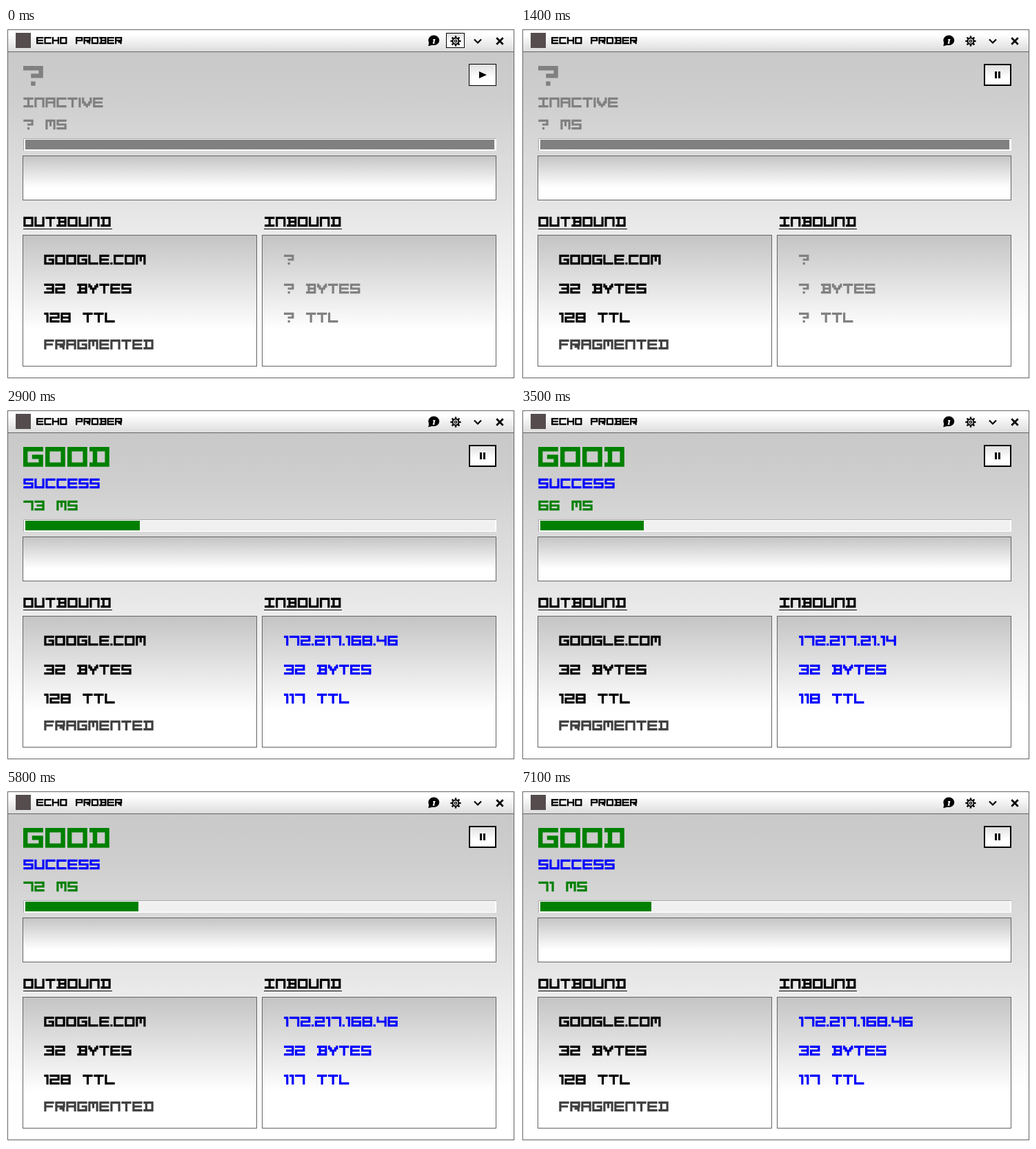
An HTML page for the animation above (7.2 s loop, 738 px wide and 512 px high).

```html
<!DOCTYPE html>
<html lang="en">
<head>
<meta charset="utf-8">
<title>Echo Prober</title>
<style>
  html, body { margin: 0; width: 100%; height: 100%; overflow: hidden; background: #fff; }
  svg { display: block; width: 738px; height: 512px; }
  .word path { fill: none; stroke-width: 2; stroke-linecap: square; stroke-linejoin: miter; }
  .word text { fill: none; font: 12px "DejaVu Sans Mono", monospace; }
</style>
</head>
<body>
<svg viewBox="0 0 738 512" xmlns="http://www.w3.org/2000/svg">
  <defs>
    <linearGradient id="bar" x2="0" y2="1">
      <stop offset=".2" stop-color="#fff"/><stop offset="1" stop-color="#dcdcdc"/>
    </linearGradient>
    <linearGradient id="page" x2="0" y2="1">
      <stop stop-color="#c6c6c6"/><stop offset=".2" stop-color="#cecece"/><stop offset=".85" stop-color="#fff"/>
    </linearGradient>
    <linearGradient id="panel" x2="0" y2="1">
      <stop stop-color="#c4c4c4"/><stop offset=".72" stop-color="#fff"/>
    </linearGradient>
    <linearGradient id="key" x2="0" y2="1">
      <stop stop-color="#dedede"/><stop offset=".6" stop-color="#fff"/>
    </linearGradient>
  </defs>

  <rect width="738" height="512" fill="#fff"/>
  <rect x="2.5" y="2.5" width="734" height="505" fill="url(#page)" stroke="#646464"/>
  <rect x="3" y="3" width="733" height="31" fill="url(#bar)"/>
  <path d="M3 34.5H736" stroke="#646464"/>
  <rect x="14" y="7" width="22" height="22" fill="#554d4d"/>

  <!-- info, settings, minimise, close -->
  <ellipse cx="620.3" cy="17.8" rx="8" ry="7.2"/>
  <path d="M613.5 20L612.3 26.3L619 24.5Z"/>
  <path d="M621.4 13.2h.1M619.3 16.9H621.2L619.9 21.8H621.4" fill="none" stroke="#fff" stroke-width="2"/>
  <rect id="focus" x="638.5" y="7.5" width="26" height="21" fill="url(#key)" stroke="#000"/>
  <g id="gear" transform="translate(652 19)" fill="none" stroke="#000">
    <circle r="4.4" stroke-width="2"/><circle r="1.6" stroke-width="1.4"/>
  </g>
  <path d="M679 16.5L684 21.5L689 16.5" fill="none" stroke="#000" stroke-width="2.2"/>
  <path d="M711.3 14.3L720.7 23.7M720.7 14.3L711.3 23.7" stroke="#000" stroke-width="2.7"/>

  <rect id="button" fill="url(#key)" stroke="#000"/>
  <path id="symbol"/>

  <rect x="25" y="160" width="686" height="18" fill="#fff"/>
  <path d="M25.5 178V160.5H711" fill="none" stroke="#a6a6a6"/>
  <rect x="27" y="162" width="682" height="15" fill="#f0f0f0"/>
  <rect id="meter" x="28" y="162" height="14"/>

  <g fill="url(#panel)" stroke="#646464">
    <rect x="24.5" y="185.5" width="686" height="64"/>
    <rect x="24.5" y="300.5" width="339" height="190"/>
    <rect x="371.5" y="300.5" width="339" height="190"/>
  </g>
  <path d="M25 291.5H154M374 291.5H487" stroke="#000"/>
  <g id="labels"></g>
  <g id="readout"></g>
</svg>

<script>
const LOOP = 7200, START = 1000, FULL_MS = 300, FULL_WIDTH = 680;
const GREEN = '#008000', BLUE = '#0000ff', GRAY = '#808080';
const $ = id => document.getElementById(id);

// Strokes on a 9 by 9 cell
const GLYPHS = {
  A: 'M1 8V1H8V8M1 4.5H8',
  B: 'M1 1H8V8H1M2.5 1V8M2.5 4.5H8',
  C: 'M8 1H1V8H8',
  D: 'M1 1H8V8H1M2.5 1V8',
  E: 'M8 1H1V8H8M1 4.5H7.5',
  F: 'M8 1H1V8M1 4.5H7',
  G: 'M8 1H1V8H8V4.5H5',
  H: 'M1 1V8M8 1V8M1 4.5H8',
  I: 'M1 1H8M1 8H8M4.5 1V8',
  i: 'M1 1V8',
  L: 'M1 1V8H8',
  M: 'M1 8V1H8V8M4.5 1V5',
  N: 'M1 8V1H8V8',
  O: 'M1 1H8V8H1Z',
  P: 'M1 8V1H8V4.5H1',
  R: 'M1 8V1H8V4.5H1M5 5V6.5H7.5V8',
  S: 'M8 1H1V4.5H8V8H1',
  T: 'M1 1H8M4.5 1V8',
  U: 'M1 1V8H8V1',
  V: 'M1 1V4.5H2.5V6.5H4.5V8M8 1V4.5H6.5V6.5H4.5',
  Y: 'M1 1V2.5H2.5V4.5H6.5V2.5H8V1M4.5 4.5V8',
  1: 'M1 1H3V8',
  2: 'M1 1H8V4.5H1V8H8',
  3: 'M1 1H8V8H1M3 4.5H8',
  4: 'M1 1V4.5H8M8 1V8',
  6: 'M8 1H1V8H8V4.5H1',
  7: 'M1 1H8V8',
  8: 'M1 1H8V8H1ZM1 4.5H8',
  '.': 'M1 8h.01',
  '?': 'M1 1H8V4.5H4.5M4.5 8h.01'
};
const ADVANCE = { 1: 5, '.': 3, i: 3 };

function word(text, x, y, color = '#000', unit = 1.6) {
  let pen = 0, strokes = '';
  for (const c of text) {
    if (GLYPHS[c]) strokes += `<path transform="translate(${pen})" d="${GLYPHS[c]}"/>`;
    pen += ADVANCE[c] || 10;
  }
  return `<g class="word" transform="translate(${x} ${y}) scale(${unit})" stroke="${color}">` +
    `${strokes}<text y="9" stroke="none">${text.toUpperCase()}</text></g>`;
}

const NEAR = { host: '172.217.21.14', ttl: 118 };
const FAR = { host: '172.217.168.46', ttl: 117 };
const REPLIES = [
  { at: 2000, ms: 73, ...FAR },
  { at: 3100, ms: 66, ...NEAR },
  { at: 5200, ms: 72, ...FAR },
  { at: 6200, ms: 71, ...FAR }
];

function showReply(reply) {
  const good = reply ? GREEN : GRAY, info = reply ? BLUE : GRAY;
  const r = reply || { ms: '?', host: '?', ttl: '?' };
  $('readout').innerHTML =
    word(reply ? 'GOOD' : '?', 25, 55, good, 3.2) +
    word(reply ? 'SUCCESS' : 'INACTiVE', 25.3, 100.8, info) +
    word(`${r.ms} MS`, 25.3, 132.8, good) +
    word(r.host, 403, 328.8, info) +
    word(`${reply ? 32 : '?'} BYTES`, 403, 370.8, info) +
    word(`${r.ttl} TTL`, 403, 412.8, info);
  $('meter').setAttribute('fill', good);
  $('meter').setAttribute('width', reply ? Math.round(r.ms / FULL_MS * 682) : FULL_WIDTH);
}

function showRunning(running) {
  const inset = running ? 1 : 0.5;
  const box = { x: 671 + inset, y: 52 + inset, width: 40 - 2 * inset, height: 32 - 2 * inset, 'stroke-width': 2 * inset };
  for (const name in box) $('button').setAttribute(name, box[name]);
  $('symbol').setAttribute('d', running ? 'M687 63h3v10h-3zM692 63h3v10h-3z' : 'M686 63L697 68L686 73Z');
  $('focus').style.display = running ? 'none' : '';
}

$('labels').innerHTML =
  word('ECHO PROBER', 44, 13, '#000', 1.14) +
  word('OUTBOUND', 25.3, 273.8) +
  word('INBOUND', 375, 273.8) +
  word('GOOGLE.COM', 55.3, 328.8) +
  word('32 BYTES', 55.3, 370.8) +
  word('128 TTL', 55.3, 412.8) +
  word('FRAGMENTED', 55.3, 451.8, '#404040');

for (let a = 0; a < 360; a += 45)
  $('gear').innerHTML += `<path d="M0-4.6V-7.6" stroke-width="2.4" transform="rotate(${a})"/>`;

let shown;
function draw(t) {
  const running = t >= START;
  const count = REPLIES.filter(r => r.at <= t).length;
  const state = `${running} ${count}`;
  if (state === shown) return;
  shown = state;
  showRunning(running);
  showReply(REPLIES[count - 1]);
}

function tick() {
  draw(performance.now() % LOOP);
  requestAnimationFrame(tick);
}
tick();
</script>
</body>
</html>
```
